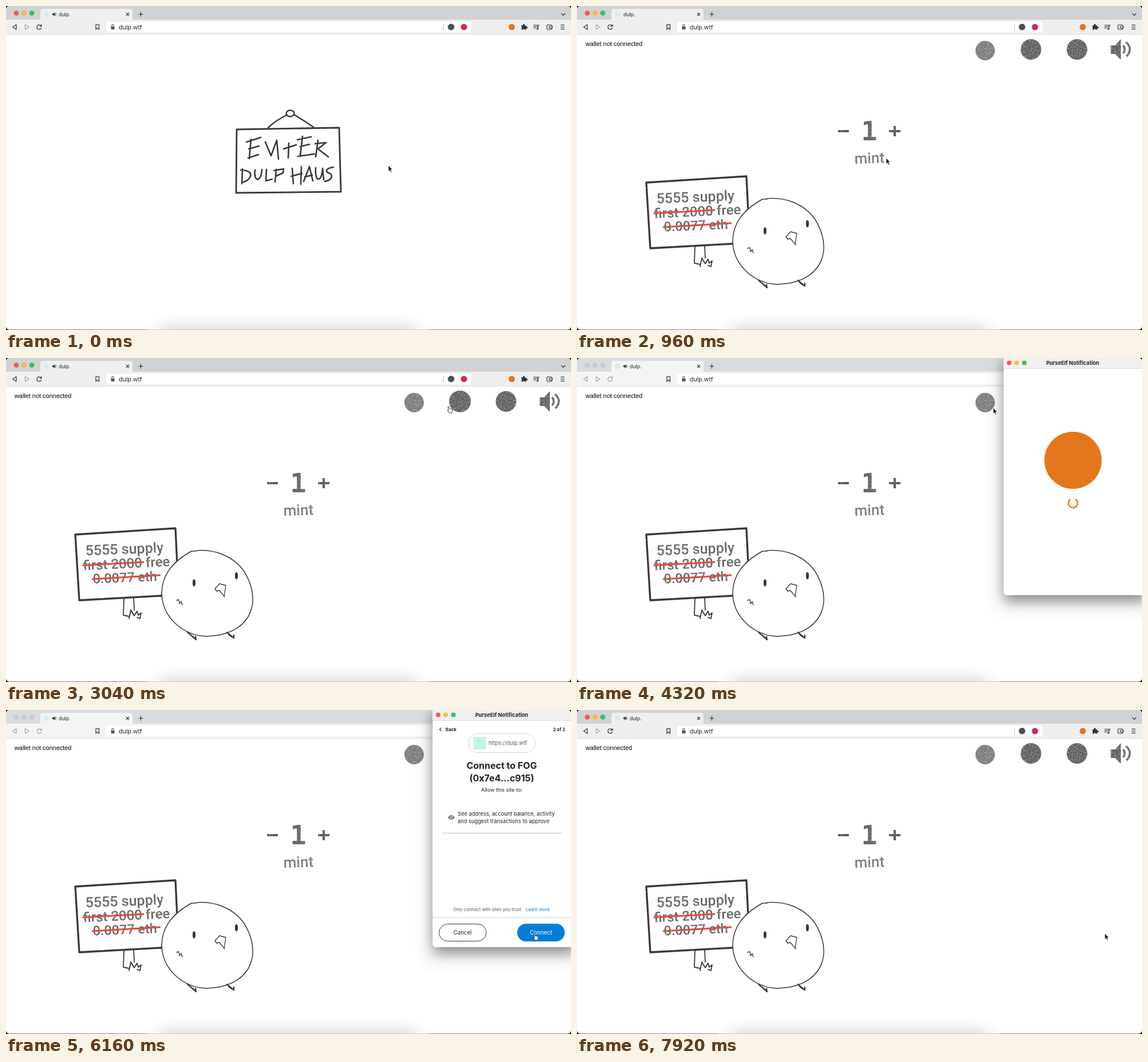
Write an HTML page that moves like this. It is 987x567 px and loops after 8 s.

```html
<!DOCTYPE html>
<html lang="en">
<head>
<meta charset="utf-8">
<title>dulp.</title>
<style>
html, body { margin: 0; width: 100%; height: 100%; overflow: hidden; background: #fff; }
svg { display: block; width: 100%; height: 100%; --strip: #d1d2d4; --bar: #efeff0; --nav: #333; }
svg.inactive { --strip: #d8dcdf; --bar: #f5f4f4; --nav: #a2a3a5; }
text { font-family: Inter, sans-serif; fill: #222; }
.mid { text-anchor: middle; }
.bold { font-weight: 700; }
.strip { fill: var(--strip); }
.bar { fill: var(--bar); }
.line { fill: none; stroke: #333; stroke-width: 1.2; }
.nav { fill: none; stroke: var(--nav); stroke-width: 1.2; stroke-linejoin: round; }
.inactive .light { fill: #cbced1; stroke: #bfc2c5; }
.ink { fill: none; stroke: #383838; stroke-linecap: round; stroke-linejoin: round; }
.pencil, .pencil text { fill: #606060; }
.pencil text { font-family: Roboto, sans-serif; font-weight: 500; }
.brand { fill: #e4761b; }
.mint { fill: #c4f3e5; }
.link { fill: #037dd6; }
</style>
</head>
<body>
<svg id="stage" viewBox="0 0 987 567">
  <defs>
    <filter id="soft" x="-10%" y="-100%" width="120%" height="300%">
      <feGaussianBlur stdDeviation="9"/>
    </filter>
    <filter id="rough" x="-5%" y="-5%" width="110%" height="110%" color-interpolation-filters="sRGB">
      <feTurbulence type="fractalNoise" baseFrequency=".5" numOctaves="2" seed="4"/>
      <feDisplacementMap in="SourceGraphic" scale="1.6" xChannelSelector="R" yChannelSelector="G"/>
    </filter>
    <filter id="grain" x="-5%" y="-10%" width="110%" height="120%" color-interpolation-filters="sRGB">
      <feTurbulence type="fractalNoise" baseFrequency=".45 .3" numOctaves="2" seed="7"/>
      <feColorMatrix values="0 0 0 0 0  0 0 0 0 0  0 0 0 0 0  1.1 0 0 0 .4"/>
      <feComposite in="SourceGraphic" operator="in"/>
    </filter>
    <filter id="shade" x="-25%" y="-15%" width="150%" height="140%">
      <feDropShadow dx="0" dy="11" stdDeviation="12" flood-color="#000" flood-opacity=".48"/>
    </filter>
    <clipPath id="window"><rect width="987" height="566.5" rx="6"/></clipPath>
  </defs>

  <rect width="987" height="567" fill="#25121f"/>
  <g clip-path="url(#window)">
    <rect width="987" height="567" fill="#fff"/>
    <rect class="strip" width="987" height="25"/>
    <rect class="bar" y="24" width="987" height="25"/>
    <path d="M0 49.5H987" stroke="#dcdcdd"/>
    <path class="bar" d="M56 25Q60 25 60 21V9Q60 5 64 5H217Q221 5 221 9V21Q221 25 225 25Z"/>
    <g stroke-width=".5">
      <circle class="light" cx="18" cy="12.5" r="4" fill="#fc5850" stroke="#df443d"/>
      <circle class="light" cx="31.5" cy="12.5" r="4" fill="#fcbb40" stroke="#dda032"/>
      <circle class="light" cx="45" cy="12.5" r="4" fill="#34c648" stroke="#26a738"/>
    </g>
    <circle class="mint" cx="71" cy="14.5" r="5" opacity=".8"/>
    <g id="speaker">
      <path d="M81 13H83L85.5 11V18L83 16H81Z" fill="#333"/>
      <path d="M87 12.5V16.5" stroke="#333"/>
    </g>
    <text id="tabTitle" x="92" y="17.5" font-size="8.8">dulp.</text>
    <path class="line" d="M210 12L215 17M215 12L210 17M231.5 14.5H239.5M235.5 10.5V18.5M970 13L973.5 16.5L977 13"/>

    <path class="nav" d="M18 32.5V41L11.5 36.8Z"/>
    <path class="nav" d="M33.5 32.5V41L40 36.8Z" style="stroke:#a6a6a8"/>
    <path class="nav" d="M61.3 34.8A4 4 0 1 0 61.8 38M62 32V35.3H58.5"/>
    <path class="line" d="M157 32.5H162.5V41L159.7 38.6L157 41Z"/>
    <rect x="175" y="27.5" width="638" height="18.5" rx="3.5" fill="#fff"/>
    <rect x="183.5" y="36" width="6" height="5" rx=".7" fill="#555"/>
    <path class="line" d="M184.7 36V34.5A1.8 1.8 0 0 1 188.3 34.5V36" style="stroke:#555"/>
    <text x="197" y="40.5" font-size="10.6">dulp.wtf</text>
    <path d="M764.5 32V42" stroke="#bbb"/>
    <circle cx="777.5" cy="36.8" r="5.7" fill="#4b4f55"/>
    <circle cx="800" cy="36.8" r="5.5" fill="#c9304f"/>
    <circle class="brand" cx="883.5" cy="36.8" r="5.5"/>
    <path d="M900.5 34H903.2A1.7 1.7 0 1 1 906 34H908.5V36.3A1.7 1.7 0 1 1 908.5 39V41.5H906A1.5 1.5 0 0 0 903 41.5H900.5V39A1.5 1.5 0 0 0 900.5 36.5Z" fill="#333"/>
    <path class="line" d="M921.5 33.5H929M921.5 36.3H929M921.5 39H925.5M929.5 40V33.5H932"/>
    <circle cx="928.3" cy="40" r="1.6" fill="#333"/>
    <rect class="line" x="945" y="33" width="8.5" height="8" rx="1.5"/>
    <rect class="line" x="949" y="35.5" width="5.5" height="3.2" rx=".6" style="fill:#efeff0"/>
    <path class="line" d="M969 33.3H975.5M969 36.8H975.5M969 40.3H975.5"/>

    <path d="M247 567Q253 543 290 543H695Q732 543 738 567Z" fill="#fbfbfb"/>
    <rect x="270" y="561" width="445" height="40" rx="12" fill="#dcdcdc" filter="url(#soft)"/>

    <g id="entry" class="ink" filter="url(#rough)">
      <ellipse cx="496.5" cy="188" rx="7" ry="5.5" stroke-width="2.5"/>
      <path d="M490 191Q470 201 458 213M503 190Q520 200 537 212" stroke-width="2.5"/>
      <g id="sign">
        <path d="M403 216L582 213L585 325L402 327Z" stroke-width="2.8"/>
        <path stroke-width="2.6" d="M428 233L425 267M420 238L445 230M424 250L442 245M423 266L441 260
          M453 238L463 262L473 235L476 268M494 240L493 266M485 250L507 243
          M518 228L514 262M509 234L533 229M514 246L530 242M510 263L539 259
          M545 235L541 264M540 241L559 239L545 250L563 264"/>
        <path stroke-width="2.6" d="M413 285L412 311M410 287Q430 288 427 298Q424 306 412 309
          M435 287C432 309 446 309 447 286M455 286L454 306L465 303M472 286L470 308M468 288L485 285L484 292L471 298
          M500 284L502 311M516 281L515 312M498 298L517 293M520 307L530 281L536 306M522 299L535 296
          M541 283C539 310 552 309 553 284L555 304M572 282C559 284 556 290 566 293C573 298 567 305 557 307"/>
      </g>
    </g>

    <g id="home">
      <text id="wallet" x="15" y="70" font-size="10.9" style="font-family:'Liberation Sans',Arial,sans-serif;fill:#000">wallet not connected</text>
      <g class="pencil" filter="url(#grain)">
        <circle cx="713" cy="78" r="17" fill="#7c7c7c"/>
        <circle id="boat" cx="793" cy="76" r="18"/>
        <circle cx="873.5" cy="76" r="18"/>
        <g id="sound">
          <path d="M932.5 69H940L950 58V94L940 84H932.5Z"/>
          <path d="M954 69Q959.5 75.5 954 83M959 63Q972 75 960 88" fill="none" stroke="#666" stroke-width="3.5"/>
        </g>
      </g>
      <g class="pencil" filter="url(#grain)">
        <path d="M456 219H475M545 219H565M555 210V228" stroke="#585858" stroke-width="4.2"/>
        <text class="mid" x="510.5" y="235" font-size="47" style="font-family:'DejaVu Sans Mono',monospace;font-weight:700">1</text>
        <text x="485" y="276" font-size="26" transform="rotate(-2 485 276)" style="fill:#767676">mint</text>
      </g>
      <g class="ink" filter="url(#rough)">
        <path d="M272 416L128 424L121 309L296 298L299 360" stroke-width="3.3"/>
        <path d="M206 420L205 450L214 452M223 419L224 441M215 456L218 441L224 451L229 443L231 450L236 446L234 456L229 454" stroke-width="1.8"/>
      </g>
      <g class="pencil" filter="url(#grain)">
        <text x="139" y="345.5" font-size="25" transform="rotate(-2.3 139 345)">5555 supply</text>
        <text x="135" y="371.5" font-size="24" transform="rotate(-2.8 135 371)">first 2000 free</text>
        <text x="152" y="394.5" font-size="23.4" transform="rotate(-2.3 152 394)">0.0077 eth</text>
      </g>
      <path d="M134 363L241 357M150 387L270 380" stroke="#e8473d" stroke-width="3" filter="url(#rough)"/>
      <g class="ink" stroke-width="1.5" filter="url(#rough)">
        <path fill="#fff" d="M332 337C365 334 397 347 415 372C430 395 433 418 430 434C423 468 392 486 350 487C311 486 272 455 272 410C273 382 287 359 324 338L332 338"/>
        <path d="M381 417L384 398L373 395L365 404L368 408L373 407L382 418M298 424L302 423L303 430L306 426L308 432" stroke-width="1.3"/>
        <path d="M317 480L332 493L331 487M322 484L331 491M386 480L398 490L398 485M389 484L396 489" stroke-width="2.2"/>
        <ellipse cx="328.5" cy="393.5" rx="1.8" ry="5.5" fill="#383838"/>
        <ellipse cx="402.5" cy="381" rx="1.8" ry="5.5" fill="#383838"/>
      </g>
    </g>

    <g id="popup">
      <path d="M714 26H987V460H760Q714 460 714 414Z" fill="#000" opacity=".012"/>
      <rect x="745.5" y="-8" width="250" height="423" rx="6" fill="#fff" filter="url(#shade)"/>
      <path d="M745.5 0H987V18H745.5Z" fill="#f1eff0"/>
      <path d="M745.5 18.5H987" stroke="#e0dedf"/>
      <circle cx="755" cy="8.5" r="4" fill="#fc5850"/>
      <circle cx="768" cy="8.5" r="4" fill="#fcbb40"/>
      <circle cx="781.5" cy="8.5" r="4" fill="#34c648"/>
      <text class="mid bold" x="866" y="11.5" font-size="9.2">PurseElf Notification</text>

      <g id="loading">
        <circle class="brand" cx="866.5" cy="179" r="50"/>
        <path id="spinner" d="M862 247.2A8 8 0 1 0 870.5 247" fill="none" stroke="#e4761b" stroke-width="2.4"/>
      </g>

      <g id="request">
        <text id="pageNo" class="bold" x="977" y="37" font-size="7.8" text-anchor="end"></text>
        <rect x="808" y="41.5" width="116.5" height="33" rx="16.5" fill="#fff" stroke="#cfd3d6"/>
        <rect class="mint" x="816.5" y="47" width="22" height="22"/>
        <text x="843" y="61" font-size="9.3" style="fill:#535a61">https://dulp.wtf</text>
        <g id="accounts">
          <text class="mid bold" x="866" y="103" font-size="16">Connect with PurseElf</text>
          <text class="mid" x="866" y="122" font-size="8.7">Select the account(s) to use on this site</text>
          <text class="link" x="925" y="146" font-size="8">New account</text>
          <rect x="762" y="155" width="209" height="42" rx="4" fill="#fff" stroke="#d2d8dd"/>
          <rect x="772" y="171" width="10" height="10" rx="2" fill="#037dd6"/>
          <path d="M774 176L776.5 178.5L780.5 173.5" fill="none" stroke="#fff" stroke-width="1.3"/>
          <text x="792" y="179" font-size="9">FOG (0x7e4...c915)</text>
        </g>
        <g id="consent">
          <path class="line" d="M760.5 31L757.5 34L760.5 37"/>
          <text class="bold" x="768" y="37" font-size="7.8">Back</text>
          <text class="mid bold" x="866" y="103" font-size="16">Connect to FOG</text>
          <text class="mid bold" x="866" y="125" font-size="16">(0x7e4...c915)</text>
          <text class="mid" x="866" y="143" font-size="9">Allow this site to:</text>
          <path d="M772 188Q778 180 784 188Q778 196 772 188Z" fill="#6a737d"/>
          <circle cx="778" cy="188" r="2.2" fill="#6a737d" stroke="#fff"/>
          <text font-size="9.3"><tspan x="789" y="185">See address, account balance, activity</tspan><tspan x="789" y="198">and suggest transactions to approve</tspan></text>
          <path d="M762 215.5H971" stroke="#b9bec3"/>
        </g>
        <text x="781" y="351.5" font-size="7.7" style="fill:#535a61">Only connect with sites you trust.</text>
        <text class="link" x="908" y="351.5" font-size="7.8">Learn more</text>
        <path d="M745.5 363.5H987" stroke="#d6d9dc"/>
        <rect x="756.5" y="374.5" width="82.5" height="30" rx="15" fill="#fff" stroke="#33383d"/>
        <text class="mid" x="797.5" y="392.5" font-size="9.7">Cancel</text>
        <rect id="button" x="893" y="374" width="83" height="31" rx="15.5"/>
        <text id="action" class="mid" x="934.5" y="392.5" font-size="9.7" style="fill:#fff"></text>
      </g>

      <g id="connecting">
        <text class="mid bold" x="866" y="126" font-size="16">Connecting...</text>
        <rect class="mint" x="782" y="187" width="26" height="26"/>
        <path d="M816 200H920" stroke="#bbc0c5" stroke-dasharray="4 4"/>
        <circle cx="866" cy="200" r="11" fill="#28a745"/>
        <path d="M861 200L865 204L871.5 196.5" fill="none" stroke="#fff" stroke-width="1.8"/>
        <g id="dots" fill="#6a737d">
          <circle cx="932" cy="200" r="2.2"/><circle cx="937.5" cy="200" r="2.2"/><circle cx="943" cy="200" r="2.2"/>
        </g>
      </g>
    </g>

    <g id="cursor">
      <path id="arrow" d="M0 0V10.5L2.4 8.3L4.1 12.2L6 11.4L4.3 7.6H7.3Z" fill="#111" stroke="#fff" stroke-width=".8"/>
      <path id="hand" d="M2 6.5L.9 1.5Q1.4 .3 2.5 1.2L3.7 4.5Q5 3.6 5.5 4.7Q6.8 4.1 7.2 5.3Q8.5 5 8.7 6.5L8.5 9.5L7.5 12H3.5L.1 8Q-.2 6.7 2 7.8Z" fill="#fff" stroke="#222" stroke-width=".9"/>
      <path id="edge" d="M-2 0L2 -3.5V-1H6V1H2V3.5Z" fill="#111"/>
    </g>
  </g>
</svg>
<script>
const LOOP = 8000, STEP = 80;
const el = {};
document.querySelectorAll('[id]').forEach(node => { el[node.id] = node; });

// time, x, y, pointer shape
const path = [
  [0, 668, 279, 'arrow'], [80, 660, 279, 'arrow'], [320, 580, 270, 'hand'],
  [480, 538, 263, 'hand'], [560, 537, 263, 'hand'], [880, 540, 266, 'hand'],
  [960, 540, 266, 'arrow'], [1280, 548, 264, 'arrow'], [1600, 972, 132, 'arrow'],
  [1680, 985, 128, 'edge'], [1760, 983, 122, 'arrow'], [2080, 957, 74, 'hand'],
  [2320, 922, 76, 'arrow'], [2480, 890, 78, 'hand'], [2640, 850, 80, 'arrow'],
  [2720, 812, 82, 'hand'], [2960, 772, 84, 'hand'], [3040, 771, 84, 'hand'],
  [3120, 763, 85, 'arrow'], [3280, 732, 86, 'hand'], [3520, 727, 87, 'hand'],
  [3680, 727, 87, 'arrow'], [4560, 727, 87, 'arrow'], [5360, 918, 390, 'arrow'],
  [5440, 921, 393, 'hand'], [6480, 921, 390, 'arrow'], [7919, 921, 390, 'arrow'],
  [7920, 922, 391, 'arrow'], [LOOP, 922, 391, 'arrow']
];

const show = (id, on) => { el[id].style.display = on ? '' : 'none'; };
const within = (t, from, to) => t >= from && t < to;
const turn = (id, deg, x, y) => el[id].setAttribute('transform', `rotate(${deg} ${x} ${y})`);
const setText = (id, value) => { if (el[id].textContent !== value) el[id].textContent = value; };

function moveCursor(t) {
  const next = path.findIndex(key => key[0] > t);
  const [t0, x0, y0, shape] = path[next - 1];
  const [t1, x1, y1] = path[next];
  const k = (t - t0) / (t1 - t0);
  el.cursor.setAttribute('transform', `translate(${x0 + (x1 - x0) * k} ${y0 + (y1 - y0) * k})`);
  for (const id of ['arrow', 'hand', 'edge']) show(id, id === shape);
}

function render(t) {
  const popup = within(t, 3680, 7440);
  const firstPage = t < 5840;
  const audible = !within(t, 320, 1280);

  el.stage.classList.toggle('inactive', popup);
  show('speaker', audible);
  el.tabTitle.setAttribute('x', audible ? 92 : 81);

  show('entry', t < 960);
  show('home', t >= 960);
  turn('sign', within(t, 320, 960) ? -1.15 * Math.sin((t - 320) / 320 * Math.PI) : 0, 496, 188);
  setText('wallet', t < 7440 ? 'wallet not connected' : 'wallet connected');
  turn('sound', within(t, 2080, 2320) ? 5 * Math.sin((t - 2080) / 120 * Math.PI) : 0, 950, 76);
  el.boat.setAttribute('r', within(t, 2720, 3120) ? 19 : 18);

  show('popup', popup);
  show('loading', t < 4560);
  turn('spinner', (t - 4320) * .36, 866.5, 254);
  show('request', within(t, 4560, 6480));
  show('accounts', firstPage);
  show('consent', !firstPage);
  setText('pageNo', firstPage ? '1 of 2' : '2 of 2');
  setText('action', firstPage ? 'Next' : 'Connect');
  el.button.setAttribute('fill', within(t, 5680, 5840) ? '#0260a4' : '#037dd6');
  show('connecting', t >= 6480);
  const active = Math.floor((t - 6480) / 160) % 3;
  [...el.dots.children].forEach((dot, i) => dot.setAttribute('opacity', i === active ? 1 : .35));

  moveCursor(t);
}

const start = performance.now();
function tick() {
  const t = (performance.now() - start) % LOOP;
  render(Math.floor(t / STEP) * STEP);
  requestAnimationFrame(tick);
}
tick();
</script>
</body>
</html>
```
